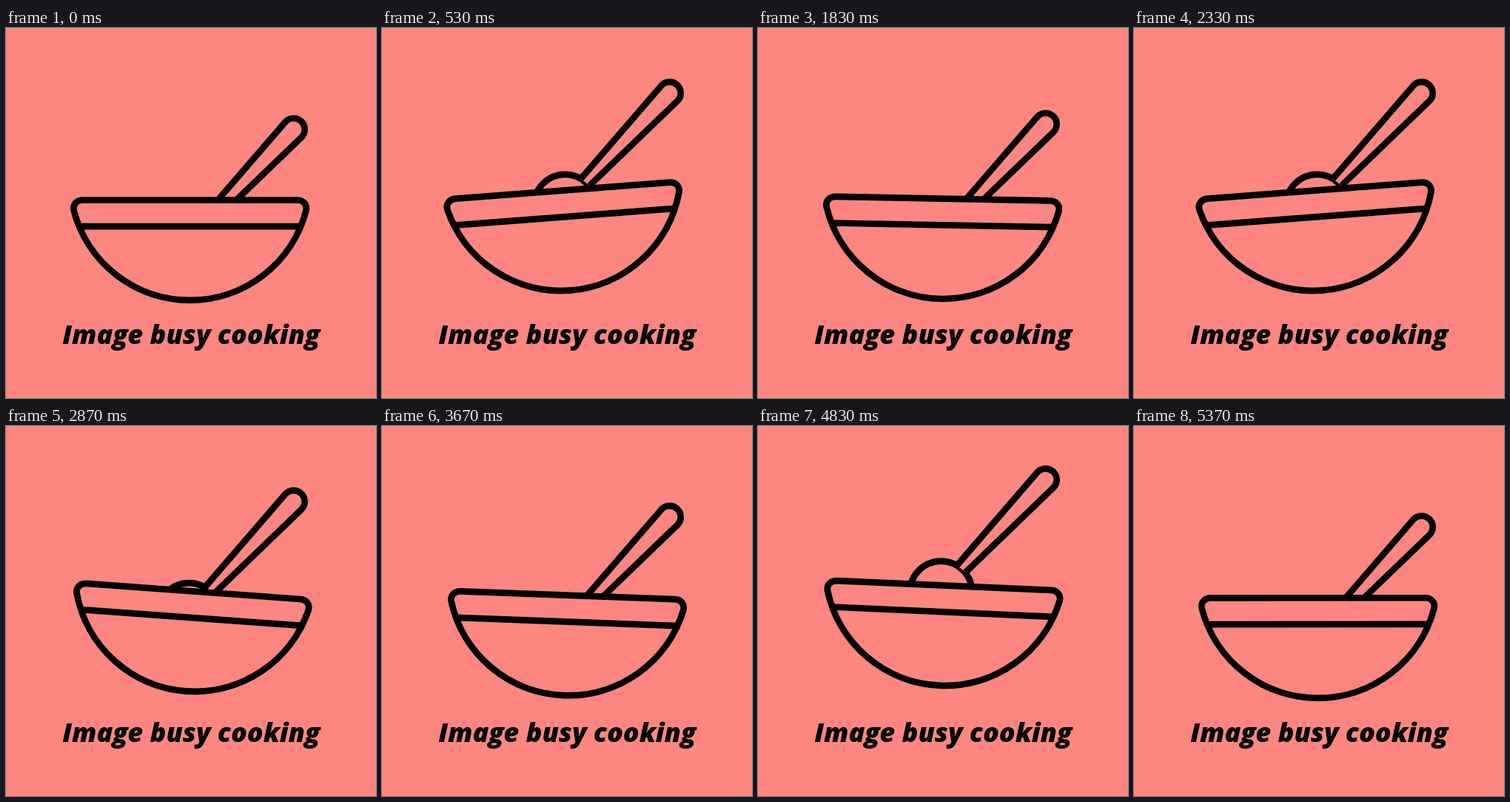
Recreate the animation shown at these times as an HTML page. Size 500 by 500 pixels, loop 5410 ms.

```html
<!DOCTYPE html>
<html lang="en">
<head>
<meta charset="utf-8">
<title>Image busy cooking</title>
<style>
  html, body { margin: 0; width: 100%; height: 100%; overflow: hidden; background: #fd8680; }
  svg { display: block; width: 100%; height: 100%; }
  .line { fill: #fd8680; stroke: #000; stroke-width: 8.7; stroke-linejoin: round; }
  text { font: italic 800 36px "Open Sans", sans-serif; text-anchor: middle; }
</style>
</head>
<body>
<svg viewBox="0 0 500 500">
  <g id="spoon" class="line">
    <circle cx="247.3" cy="289" r="42"/>
    <path d="M268.6 253 L377.6 126.8 A15 15 0 0 1 399.6 147.3 L280.6 262"/>
  </g>
  <g id="bowl" class="line">
    <path d="M104 232.5 H393.5 C401.5 232.5 407 238 405.7 246 A162.2 162.2 0 0 1 91.5 246 C90 238 96 232.5 104 232.5 Z"/>
    <path d="M99 268.2 H398"/>
  </g>
  <text x="250.2" y="427.3">Image busy cooking</text>
</svg>
<script>
  const LOOP = 5410, TOSS = 900, PEAK = 415, FPS = 30, LAST = 161;
  const HEIGHT = 70, SWING = 4.4;

  // Runs from 0 to 1 like x^m and levels off at the top; a larger n levels off later
  const level = (x, m, n) => (n * x ** m - m * x ** n) / (n - m);

  // Spoon height and bowl tilt at u ms into a toss
  function pose(u) {
    if (u < PEAK) {
      const x = u / PEAK;
      return { lift: HEIGHT * level(x, 1, 5), tilt: SWING * Math.sin(Math.PI * x) };
    }
    const x = (TOSS - u) / (TOSS - PEAK);
    return { lift: HEIGHT * level(x, 1.9, 11), tilt: -SWING * Math.sin(Math.PI * x ** 2.2) };
  }

  const spoon = document.getElementById("spoon");
  const bowl = document.getElementById("bowl");

  function draw(ms) {
    const step = Math.min(LAST, Math.floor((ms + 4) * FPS / 1000));
    const { lift, tilt } = pose((step * 1000 / FPS) % TOSS);
    spoon.setAttribute("transform", `translate(0 ${-lift})`);
    bowl.setAttribute("transform", `translate(0 ${-0.265 * lift}) rotate(${tilt} 248.3 295)`);
  }

  const start = performance.now();
  function tick() {
    draw((performance.now() - start) % LOOP);
    requestAnimationFrame(tick);
  }
  tick();
</script>
</body>
</html>
```
